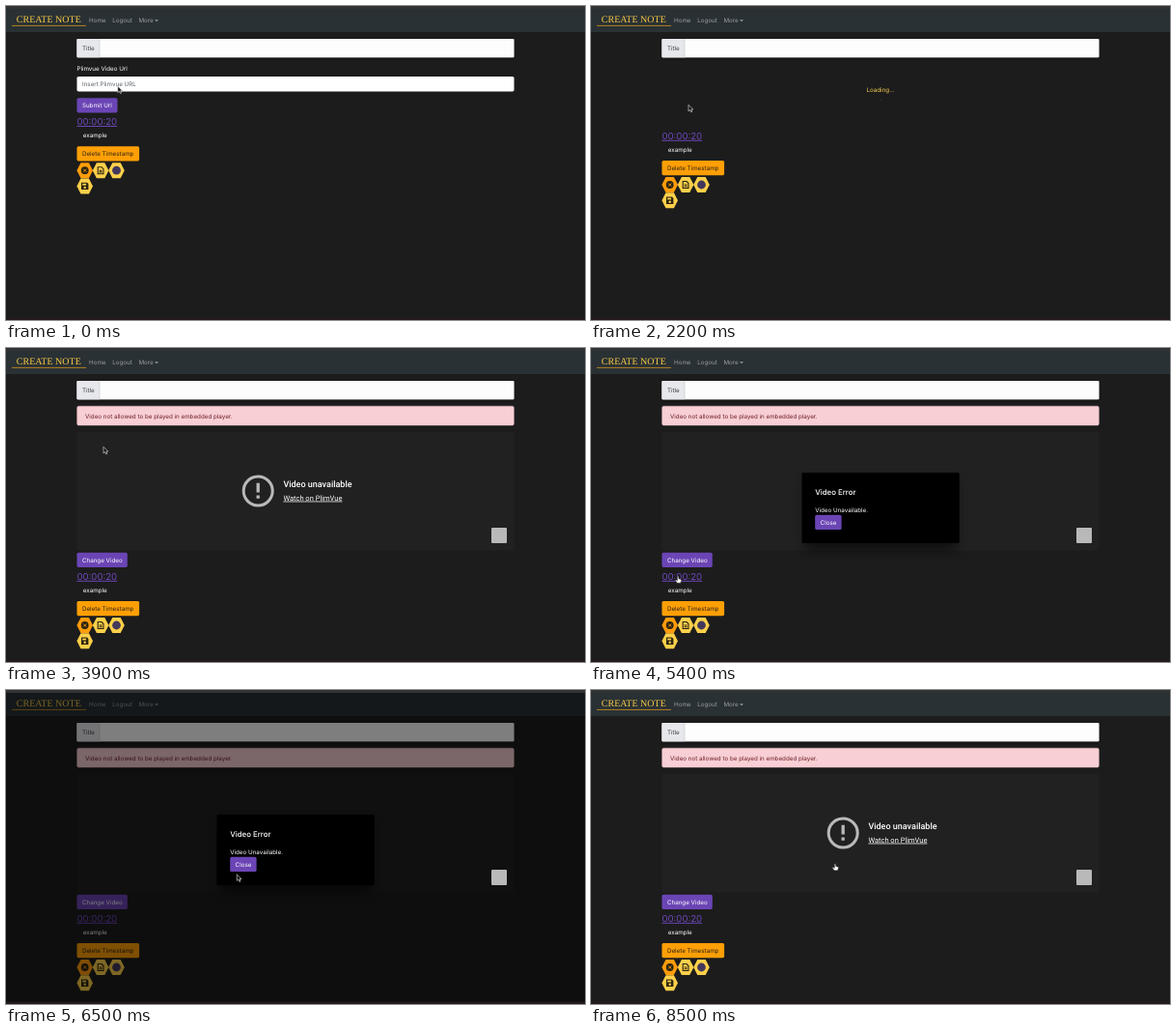
Animation of 600x325 px, one loop 8600 ms. Source, as an HTML page:

```html
<!DOCTYPE html>
<html lang="en">
<head>
<meta charset="utf-8">
<title>Create note</title>
<style>
  html, body { margin: 0; width: 100%; height: 100%; overflow: hidden; background: #1c1c1c; }
  svg { display: block; width: 100vw; height: 100vh; }
  text { font: 6.25px Inter, "Open Sans", sans-serif; fill: #fff; text-rendering: geometricPrecision; }
  .brand { font: 10px "Liberation Serif", Georgia, serif; fill: #f9cb45; }
  .nav text { fill: #999d9f; }
  .stamp { font-size: 9.65px; fill: #6f48bd; }
  .heading { font-size: 7.85px; font-weight: 500; }
  .player text { font-family: Roboto, sans-serif; }
  .purple { fill: #6b45b5; }
  .ink { fill: none; stroke: #2a2412; stroke-width: 1.1; }
</style>
</head>
<body>
<svg viewBox="0 0 600 325" preserveAspectRatio="none">
  <defs>
    <path id="hex" d="M-8.3 0L-4.2-8H4.2L8.3 0L4.2 8H-4.2Z"/>
    <filter id="soft" x="-20%" y="-30%" width="140%" height="170%"><feGaussianBlur stdDeviation="6"/></filter>
    <filter id="lift" x="-10%" y="-30%" width="120%" height="180%">
      <feDropShadow dx="0" dy="1" stdDeviation="1.5" flood-opacity=".4"/>
    </filter>
  </defs>

  <rect width="600" height="325" fill="#1c1c1c"/>
  <rect width="600" height="3" fill="#313334"/>
  <rect y="322.5" width="600" height="2.5" fill="#241a1d"/>

  <g class="nav">
    <rect y="3" width="600" height="24" fill="#293135"/>
    <text class="brand" x="10.8" y="17.3" style="fill:#f9cb45">CREATE NOTE</text>
    <path d="M6 20.4H83" stroke="#c58a1d" stroke-width=".9"/>
    <text x="86" y="17.4">Home</text>
    <text x="110.2" y="17.4">Logout</text>
    <text x="137.4" y="17.4">More</text>
    <path d="M154 14.2h4l-2 2z" fill="#999d9f"/>
  </g>

  <g filter="url(#lift)">
    <rect x="73.5" y="34" width="453" height="19.3" rx="1" fill="#fdfdfd"/>
    <path d="M74.5 34H97V53.3H74.5a1 1 0 0 1-1-1V35a1 1 0 0 1 1-1Z" fill="#e7e8ec"/>
    <path d="M97 34V53.3" stroke="#b9bdc2" stroke-width=".5"/>
  </g>
  <text x="79" y="46" style="fill:#3c4248">Title</text>

  <g id="form">
    <text x="73.4" y="67.3">Plimvue Video Url</text>
    <rect x="73.5" y="73" width="453" height="15.4" rx="1.6" fill="#fff"/>
    <rect id="focus" x="73" y="72.5" width="454" height="16.4" rx="2" fill="none" stroke="#80bdff" stroke-width="1.2" stroke-opacity=".7"/>
    <text x="79" y="83.1" style="fill:#5d646b">Insert Plimvue URL</text>
    <rect class="purple" x="73.5" y="95.2" width="42" height="15.2" rx="1.6"/>
    <text x="78.9" y="105.1">Submit Url</text>
  </g>

  <g id="loading">
    <text x="300" y="88.5" text-anchor="middle" style="fill:#f8cf52">Loading...</text>
    <circle cx="300" cy="97" r=".6" fill="#57502f"/>
  </g>

  <g id="alert">
    <rect x="73.7" y="60.2" width="452.6" height="19.8" rx="1.6" fill="#f7cfd4" stroke="#f3bcc3" stroke-width=".5"/>
    <text x="82" y="72.5" style="fill:#70202a">Video not allowed to be played in embedded player.</text>
  </g>

  <g id="video">
    <rect id="screen" x="73.5" y="60" width="453" height="122.5"/>
    <g id="unavailable" class="player">
      <circle cx="261.2" cy="121" r="15" fill="none" stroke="#b9b9b9" stroke-width="3"/>
      <path d="M261.2 112.8v9.7M261.2 125.6v3.2" stroke="#b9b9b9" stroke-width="3.3"/>
      <text x="287.4" y="117.2" style="font-size:9px;font-weight:500">Video unavailable</text>
      <text x="287.4" y="130.6" style="font-size:7.5px" text-decoration="underline">Watch on PlimVue</text>
    </g>
    <rect class="purple" x="73.5" y="184.7" width="52.3" height="15.2" rx="1.6"/>
    <text x="78.9" y="194.6">Change Video</text>
  </g>

  <g id="notes">
    <text class="stamp" x="73.4" y="123" text-decoration="underline">00:00:20</text>
    <text x="79.8" y="136">example</text>
    <rect x="73.5" y="145.2" width="64.6" height="15.2" rx="1.6" fill="#ff9f06"/>
    <text x="78.9" y="155.1" style="fill:#2c2413">Delete Timestamp</text>
    <g transform="translate(81.7 170.2)">
      <use href="#hex" fill="#ff9c0a"/>
      <circle r="3.9" fill="#2a2412"/>
      <path d="M-1.5-1.5L1.5 1.5M1.5-1.5L-1.5 1.5" stroke="#ff9c0a" stroke-width=".9"/>
    </g>
    <g transform="translate(98.1 170.2)">
      <use href="#hex" fill="#fdd04a"/>
      <path class="ink" d="M-2.9-3.5H1L2.9-1.5V3.5H-2.9ZM-1.5 0H1.5M-1.5 1.7H1.5"/>
    </g>
    <g transform="translate(114.5 170.2)">
      <use href="#hex" fill="#fdd04a"/>
      <circle r="4.4" fill="#43385c"/>
    </g>
    <g id="addStamp" transform="translate(130.9 170.2)">
      <use href="#hex" fill="#fdd04a"/>
      <path class="ink" d="M1.2-3.3A3.7 3.7 0 1 0 3.2.8M-.5-2V.3L1.2 1.4M3.2-4.2V-.6M1.4-2.4H5"/>
    </g>
    <g transform="translate(81.7 186.4)">
      <use href="#hex" fill="#fdd04a"/>
      <path d="M-3.7-3.7H2.3L3.7-2.3V3.7H-3.7Z" fill="#2a2412"/>
      <path d="M-2.5-2.6H1.4V-.8H-2.5Z" fill="#fdd04a"/>
      <circle cy="1.5" r="1.2" fill="#fdd04a"/>
    </g>
  </g>

  <rect id="backdrop" y="3" width="600" height="319.5"/>
  <rect id="badge" x="503" y="186" width="16" height="16" rx="1" fill="#b9b9b9"/>

  <g id="modal">
    <rect x="222" y="137" width="156" height="72" opacity=".55" filter="url(#soft)"/>
    <rect x="218.5" y="129" width="163.2" height="73" rx="1"/>
    <text class="heading" x="232.2" y="152.4">Video Error</text>
    <text x="232.2" y="169.7">Video Unavailable.</text>
    <rect class="purple" x="232.2" y="172.8" width="27.4" height="15.2" rx="1.6"/>
    <text x="237.6" y="182.7">Close</text>
  </g>

  <g id="cursor">
    <path id="arrow" d="M0 0V6.6L1.6 5.2L2.7 7.6L3.8 7.1L2.8 4.8H4.8Z" fill="#111" stroke="#eee" stroke-width=".6"/>
    <path id="hand" d="M-.7.6Q0-.5.7.6V2.6L3 3.2Q3.6 3.5 3.4 4.4L2.7 7H-1L-2.8 4.4Q-2.6 3.4-1.5 4L-.7 4.6Z" fill="#fff" stroke="#222" stroke-width=".5"/>
  </g>
</svg>
<script>
const LOOP = 8600;
const FOCUS = 100, SUBMIT = 1750, LOADED = 2600, FAILED = 3300, OPEN = 5400, CLOSE = 7000;
const el = Object.fromEntries([...document.querySelectorAll('g[id], rect[id], path[id]')].map(n => [n.id, n]));

// time, x, y of the pointer tip
const pointerPath = [
  [0, 115.8, 83], [800, 115.8, 83], [1500, 101, 102.3], [4000, 101, 102.3],
  [4750, 90.2, 236.2], [6100, 90.2, 236.2], [6500, 239.2, 190.8], [6850, 253, 179.8]
];

const clamp = v => Math.min(1, Math.max(0, v));
const ease = v => v * v * (3 - 2 * v);
const show = (node, on) => node.setAttribute('display', on ? 'inline' : 'none');
const move = (node, x, y) => node.setAttribute('transform', `translate(${x} ${y})`);
const inside = (x, y, [left, top, right, bottom]) => x >= left && x <= right && y >= top && y <= bottom;

function pointerAt(t) {
  const next = pointerPath.findIndex(p => p[0] > t);
  if (next < 0) return pointerPath.at(-1).slice(1);
  const [t0, x0, y0] = pointerPath[next - 1], [t1, x1, y1] = pointerPath[next];
  const k = ease((t - t0) / (t1 - t0));
  return [x0 + (x1 - x0) * k, y0 + (y1 - y0) * k];
}

function isHand(t, x, y) {
  if (t < SUBMIT) return inside(x, y, [73, 95, 116, 111]);
  if (t < FAILED) return false;
  if (t < 6100) return inside(x, y, [73, 211, 126, 227]) || inside(x, y, [73, 231, 115, 242]);
  return t > 6500 && inside(x, y, [232, 172, 260, 188]);
}

function render(t) {
  const loaded = t >= LOADED, failed = t >= FAILED;
  show(el.form, t < SUBMIT);
  show(el.focus, t >= FOCUS && t < SUBMIT - 50);
  show(el.loading, t >= SUBMIT && !loaded);
  show(el.video, loaded);
  show(el.alert, failed);
  show(el.unavailable, failed);
  show(el.badge, failed);
  show(el.addStamp, loaded && !failed);
  el.screen.setAttribute('fill', failed ? '#212121' : '#000');
  move(el.video, 0, failed ? 27 : 0);
  move(el.notes, 0, failed ? 116.8 : loaded ? 89.8 : t >= SUBMIT ? 14.8 : 0);

  const fadeOut = 1 - clamp((t - CLOSE) / 250);
  el.backdrop.setAttribute('opacity', 0.5 * ease(clamp((t - OPEN) / 280)) * fadeOut);
  el.modal.setAttribute('opacity', t >= OPEN ? fadeOut : 0);

  const [x, y] = pointerAt(t), hand = isHand(t, x, y);
  move(el.cursor, x, y);
  show(el.hand, hand);
  show(el.arrow, !hand);
}

const start = performance.now();
function tick() {
  render((performance.now() - start) % LOOP);
  requestAnimationFrame(tick);
}
tick();
</script>
</body>
</html>
```
